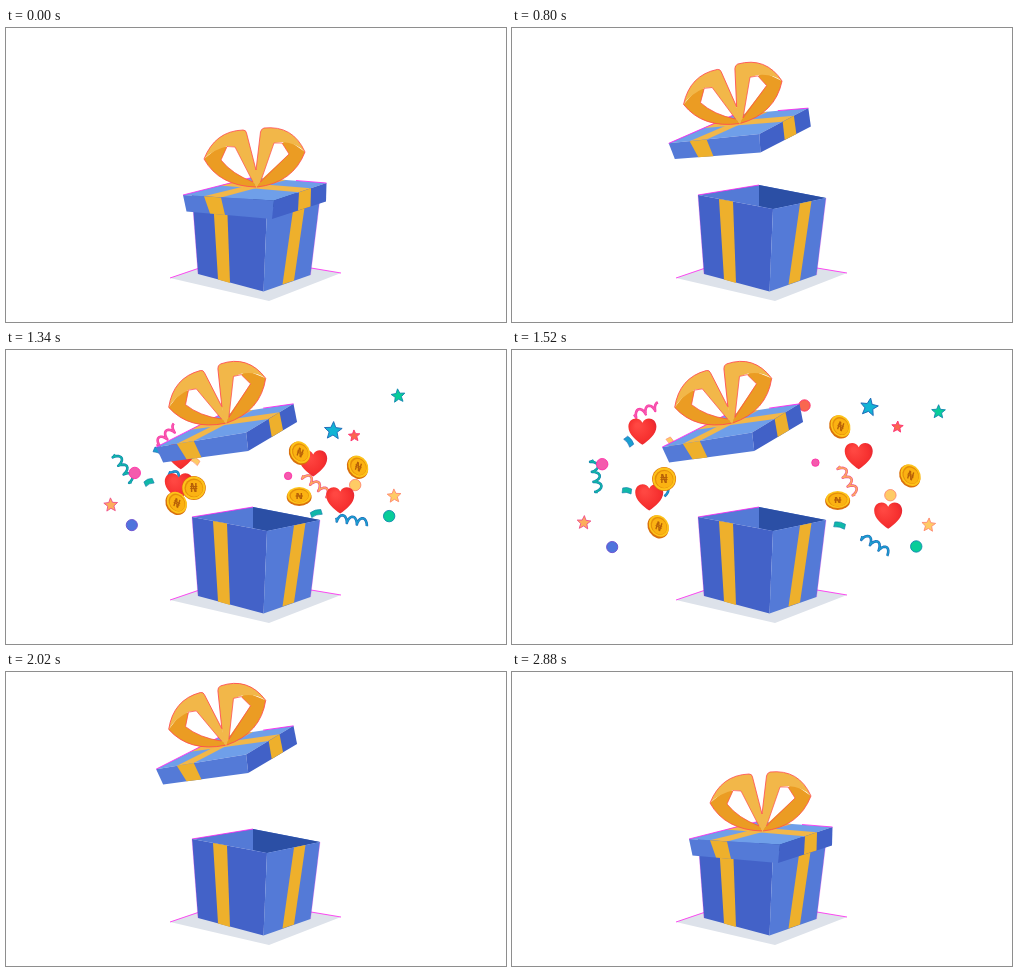
Write an HTML page with a canvas that moves like this. It is 500x294 px and loops after 3.32 s.

```html
<!DOCTYPE html>
<html lang="en">
<head>
<meta charset="utf-8">
<title>Gift box</title>
<style>
  html, body { margin: 0; width: 100%; height: 100%; overflow: hidden; background: #fff; }
  canvas { display: block; }
</style>
</head>
<body>
<canvas id="stage" width="500" height="294"></canvas>
<script>
const ctx = document.getElementById('stage').getContext('2d');
const LOOP = 3320;
const FRINGE = '#ff20f0', BOW_EDGE = '#ff4a50';
const ORIGIN = { x: 249, y: 175 };
const EARLY = 850, LATE = 970, MID = 1340, FAR = 1720, GONE = 2020;

// Fill and edge colours
const PINK = ['#f45bad', '#ff2fa8'];
const INDIGO = ['#4f74dc', '#6a4fd0'];
const CORAL = ['#f9674f', '#ff2f70'];
const YELLOW = ['#fecb65', '#ff8a70'];
const ORANGE = ['#fcae5c', '#f0508c'];
const GREEN = ['#08cd99', '#1488b0'];
const SKY = ['#12b4d4', '#1c68b8'];
const TEAL = ['#10b8a8', '#1580b0'];
const BLUE = ['#1a9fd0', '#2068b8'];

const clamp = v => Math.max(0, Math.min(1, v));
const progress = (t, from, to) => clamp((t - from) / (to - from));
const easeInOut = u => u < .5 ? 4 * u ** 3 : 1 - (2 - 2 * u) ** 3 / 2;

function fill(path, color) {
  ctx.fillStyle = color;
  ctx.fill(new Path2D(path));
}
function stroke(path, color, width = 1) {
  ctx.strokeStyle = color;
  ctx.lineWidth = width;
  ctx.stroke(new Path2D(path));
}
function paint([color, edge]) {
  ctx.fillStyle = color;
  ctx.strokeStyle = edge;
  ctx.lineWidth = .9;
  ctx.fill();
  ctx.stroke();
}

// Confetti rows: shape, x, y at MID, x, y at FAR, colours, size, angle, extra lift
const earlyPieces = [
  [drawScrap, 143, 132, 91, 165, TEAL, 9, .7],
  [drawStreamer, 118, 118, 56, 153, TEAL, 35, 1.85],
  [drawStreamer, 160, 86, 109, 37, PINK, 28, .1],
  [drawStreamer, 345, 170, 372, 237, BLUE, 33, 1, 5],
  [drawCircle, 129, 123, 51, 111, PINK, 5.7],
  [drawCircle, 126, 175, 84, 235, INDIGO, 5.6, 0, 8],
  [drawCircle, 349, 135, 406, 172, YELLOW, 5.7],
  [drawCircle, 383, 166, 410, 251, GREEN, 5.7, 0, 30],
  [drawStar, 105, 155, 48, 208, ORANGE, 7.2, .2, 4],
  [drawStar, 327, 81, 391, 38, SKY, 9.3, .3],
  [drawStar, 348, 86, 427, 82, CORAL, 6, .2],
  [drawStar, 392, 46, 453, 119, GREEN, 7.2, .15],
  [drawStar, 388, 146, 434, 232, YELLOW, 7.2, .2, 29]
];
const latePieces = [
  [drawScrap, 153, 101, 86, 101, BLUE, 10, 1.5],
  [drawScrap, 188, 110, 129, 86, YELLOW, 12, 1.65],
  [drawScrap, 310, 163, 338, 202, TEAL, 11, .8],
  [drawStreamer, 172, 127, 136, 166, BLUE, 22, 1.5],
  [drawStreamer, 310, 135, 362, 136, ORANGE, 35, 1.5],
  [drawCircle, 268, 72, 331, 63, CORAL, 5.7],
  [drawCircle, 282, 126, 331, 106, PINK, 3.7]
];
const hearts = [
  [175, 106, 75, 61], [173, 136, 99, 182],
  [307, 113, 399, 115], [334, 150, 423, 203]
];
// Coin rows end with half-axes and tilt
const coins = [
  [294, 103, 376, 54, 12, 10, 1.05], [293, 146, 370, 168, 12.5, 9, 0],
  [352, 117, 447, 163, 12, 10, 1], [171, 153, 131, 228, 12, 10, 1],
  [188, 138, 108, 126, 12, 12, 0]
];

// Quadratic flight from the box through two waypoints
function flight(start, mid, far, t) {
  const a = MID - start, b = FAR - start;
  const va = mid / a, vb = far / b, bend = (vb - va) / (b - a);
  const s = t - start;
  return (va - bend * a + bend * s) * s;
}

function fly([mx, my, fx, fy], start, time, lift, draw) {
  if (time <= start || time >= GONE) return;
  const drift = 120 * (1 - (1 - progress(time, FAR, GONE)) ** 2.5);
  const t = Math.min(time, FAR) + drift;
  const s = t - start, rest = Math.max(0, MID - t);
  const x = ORIGIN.x + flight(start, mx - ORIGIN.x, fx - ORIGIN.x, t);
  const y = ORIGIN.y + flight(start, my - ORIGIN.y, fy - ORIGIN.y, t)
    - lift * s * rest * rest / 1.74e7;
  const size = Math.min(1, .6 + s / 150);
  ctx.save();
  ctx.globalAlpha = 1 - progress(time, 1800, GONE);
  ctx.translate(x, y);
  ctx.scale(size, size);
  draw((t - FAR) / 380);
  ctx.restore();
}

function drawCircle(r, colors) {
  ctx.beginPath();
  ctx.arc(0, 0, r, 0, 7);
  paint(colors);
}

function drawStar(r, colors, turn) {
  ctx.rotate(.25 * turn);
  ctx.beginPath();
  for (let i = 0; i < 10; i++) {
    const a = i * Math.PI / 5 - Math.PI / 2, d = i % 2 ? r * .45 : r;
    ctx.lineTo(d * Math.cos(a), d * Math.sin(a));
  }
  ctx.closePath();
  paint(colors);
}

function drawStreamer(length, [color, edge], turn) {
  ctx.rotate(.85 * turn);
  ctx.beginPath();
  for (let i = 0; i <= 40; i++) {
    const x = i / 40 * length, a = x * .62;
    ctx.lineTo(x - length / 2 + 1.6 * Math.cos(a), 3.6 * Math.sin(a));
  }
  ctx.lineJoin = 'round';
  ctx.strokeStyle = edge;
  ctx.lineWidth = 2.6;
  ctx.stroke();
  ctx.strokeStyle = color;
  ctx.lineWidth = 1.4;
  ctx.stroke();
}

function drawScrap(length, [color, edge], turn) {
  const h = length / 2, path = `M${-h} -2Q0 -4 ${h} -2V3Q0 1 ${-h} 3Z`;
  ctx.rotate(1.1 * turn);
  fill(path, color);
  stroke(path, edge, .6);
}

function drawHeart() {
  const g = ctx.createRadialGradient(-5, -6, 2, 0, 0, 19);
  g.addColorStop(0, '#ff4742');
  g.addColorStop(.6, '#f6302f');
  g.addColorStop(1, '#d91e36');
  fill('M0 13.5C-6 9.5 -14 3 -14 -4.5C-14 -13.5 -3.5 -15.5 0 -8.5C3.5 -15.5 14 -13.5 14 -4.5C14 3 6 9.5 0 13.5Z', g);
}

function drawCoin(rx, ry, tilt) {
  const disc = (dx, dy, k, color) => {
    ctx.beginPath();
    ctx.ellipse(dx, dy, rx * k, ry * k, tilt, 0, 7);
    ctx.fillStyle = color;
    ctx.fill();
  };
  const depth = rx === ry ? 0 : 1;
  disc(-depth * Math.sin(tilt), depth * Math.cos(tilt), 1, '#d9700c');
  disc(0, -depth * .5, .95, '#fdc31a');
  disc(0, -depth * .5, .78, '#e58f0a');
  disc(.4, -depth * .5 + .5, .7, '#fbb212');
  ctx.rotate(tilt);
  ctx.scale(1, ry / rx);
  ctx.rotate(-tilt * .6);
  ctx.font = 'bold 13px "Noto Sans", sans-serif';
  ctx.textAlign = 'center';
  ctx.textBaseline = 'middle';
  ctx.fillStyle = '#b65f08';
  ctx.fillText('₦', 0, .7);
}

function drawConfetti(t) {
  const launch = (pieces, start) => pieces.forEach(piece => {
    const [shape, mx, my, fx, fy, colors, size, angle = 0, lift = 0] = piece;
    fly([mx, my, fx, fy], start, t, lift, turn => {
      ctx.rotate(angle);
      shape(size, colors, turn);
    });
  });
  launch(latePieces, LATE);
  launch(earlyPieces, EARLY);
  hearts.forEach(row => fly(row, LATE, t, 0, drawHeart));
  coins.forEach(row => fly(row, LATE, t, 0, () => drawCoin(...row.slice(4))));
}

function drawBoxBack() {
  fill('M164 250L230 227L335 245L263 273Z', '#dde2ea');
  stroke('M164 250L192 240.5M305 240L335 245', FRINGE, .8);
  fill('M186 167L247 157L314 170L261 181Z', '#547ad6');
  fill('M247 157L314 170L261 181L247 178Z', '#2b4fa5');
  stroke('M186 167L247 157', FRINGE, .8);
}

function drawBoxFront() {
  fill('M186 167L261 181L257.5 263.5L192 246Z', '#4362c8');
  fill('M261 181L314 170L304.5 247L257.5 263.5Z', '#547ad7');
  fill('M207 171L221 173.5L224 255L212 251.5Z', '#eeb02c');
  fill('M288 175.4L299.5 173L288 252.5L276.5 256.5Z', '#eeb02c');
  ctx.globalAlpha = .4;
  stroke('M186 167L192 246M314 170L304.5 247', FRINGE, .6);
  ctx.globalAlpha = 1;
}

function drawBow() {
  const light = '#f2b749', dark = '#eb9c23';
  fill('M198 131L215 117L221 119L215 132Q226 146 248 154L250 159Q213 158 198 131Z', dark);
  fill('M198 131Q209 103 237 102Q240 102 240.5 105L250 142L251 158L247 154L229 119L222 118Q206 122 198 131Z', light);
  fill('M299 124L282 112L276 115L283 126L254 153L251 159Q287 155 299 124Z', dark);
  fill('M299 124Q287 97 258 100Q255 101 254.5 104L250 142L249 158L254.5 154L268 115L276 114Q291 115 299 124Z', light);
  stroke('M247 154L229 119L221 118.5L215 132Q226 146 247 154M254.5 154L268 115L276 115L283 126L254.5 154', BOW_EDGE, .7);
  stroke('M250 159Q213 158 198 131Q209 103 237 102Q240 102 240.5 105L250 142L254.5 104Q255 101 258 100Q287 97 299 124Q287 155 251 159', BOW_EDGE, .8);
}

function drawLid(t) {
  const open = t < 2400
    ? easeInOut(progress(t, 550, 970))
    : 1 - easeInOut(progress(t, 2450, 2880));
  const wobble = 3.5 * Math.sin(2 * Math.PI * progress(t, 20, 540));
  ctx.save();
  ctx.translate(268 - 28 * open, 172 - 90 * open);
  ctx.rotate((wobble - 12.7 * open) * Math.PI / 180);
  ctx.translate(-268, -172);
  fill('M177 167L246 149.5L320.5 155L268 172.5Z', '#6f9fe9');
  fill('M198 168.2L215 169.4L280 152L268 151Z', '#f2b749');
  fill('M293 164.2L305 160.2L228 154L214 157.6Z', '#f2b749');
  fill('M177 167L268 172.5L266 191L180.5 183.5Z', '#547ad7');
  fill('M268 172.5L320.5 155L320 173.5L266 191Z', '#4161c7');
  fill('M198 168.2L215 169.4L219 187L204 185.5Z', '#eeb02c');
  fill('M293 164.2L305 160.2L304.5 178.5L292 182.6Z', '#eeb02c');
  stroke('M177 167L246 149.5M290 152.5L320.5 155', FRINGE, .8);
  drawBow();
  ctx.restore();
}

function render(t) {
  ctx.fillStyle = '#fff';
  ctx.fillRect(0, 0, 500, 294);
  drawBoxBack();
  drawConfetti(t);
  drawBoxFront();
  drawLid(t);
}

const begin = performance.now();
function tick() {
  render((performance.now() - begin) % LOOP);
  requestAnimationFrame(tick);
}
tick();
</script>
</body>
</html>
```
